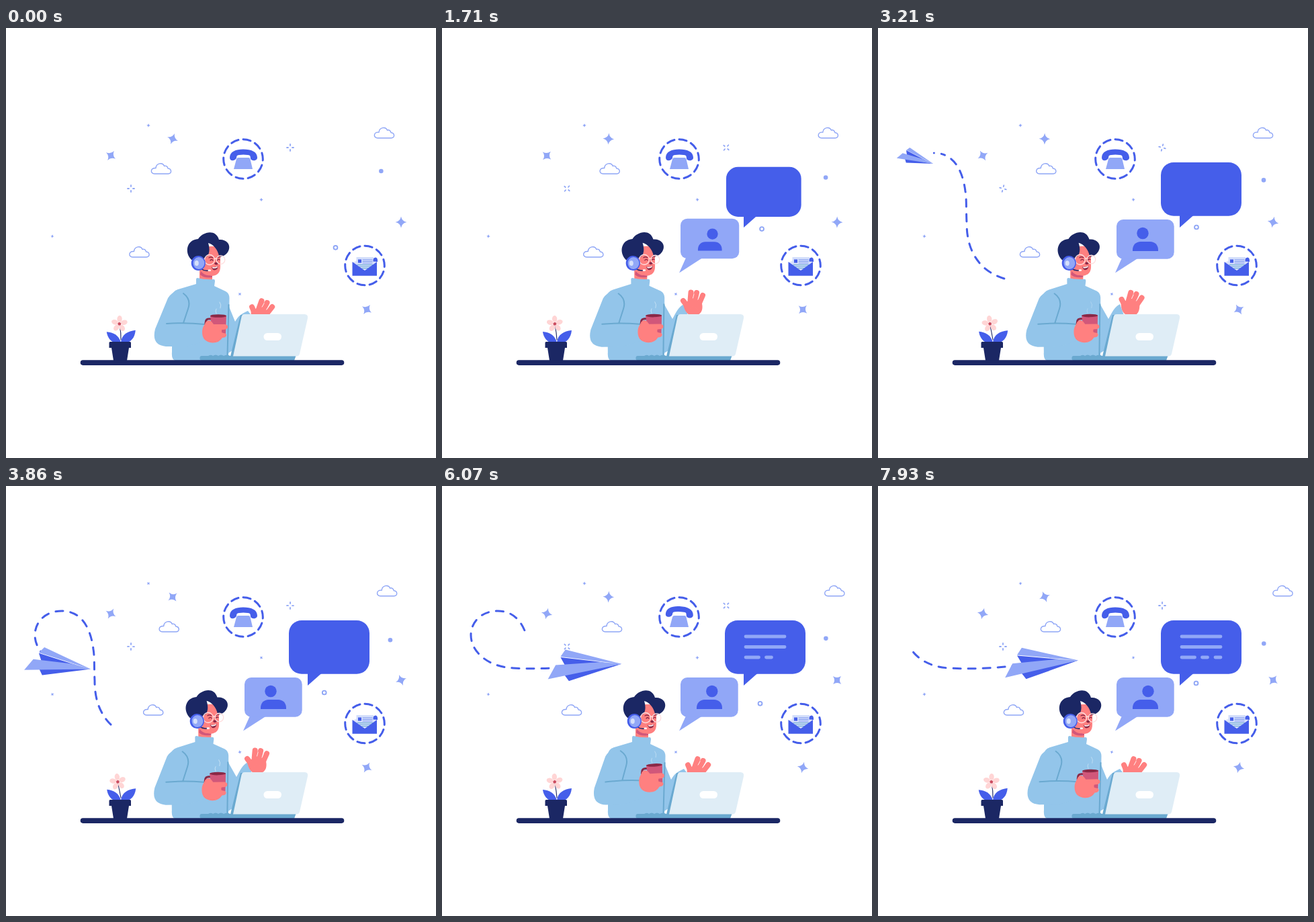
Write an HTML page that moves like this. It is 640 by 640 pixels and loops after 8 s.

```html
<!DOCTYPE html>
<html lang="en">
<head>
<meta charset="utf-8">
<title>Support desk</title>
<style>
  html, body { margin: 0; width: 100%; height: 100%; overflow: hidden; background: #fff; }
  svg { display: block; width: 100%; height: 100%; }
  .blue { fill: #455eea; }
  .pale { fill: #91a7f7; }
  .navy { fill: #1b2764; }
  .skin { fill: #ff8080; }
  .knit { fill: #93c5ea; }
  .shade { fill: #6aa9d0; }
  .wine { fill: #8a2846; }
  .line { fill: none; stroke-linecap: round; stroke-linejoin: round; }
  .fold { stroke: #6aa9d0; stroke-width: 2; }
  .thin { stroke: #8fa6f6; stroke-width: 1.4; }
  .dash { stroke: #455eea; stroke-width: 3; }
  .finger { stroke: #ff8080; stroke-width: 8; }
  .bar { stroke: #91a7f7; stroke-width: 4.8; }
</style>
</head>
<body>
<svg viewBox="0 0 640 640">
  <defs>
    <path id="spark" d="M0-8.5Q1.3-1.3 8.5 0Q1.3 1.3 0 8.5Q-1.3 1.3-8.5 0Q-1.3-1.3 0-8.5Z"/>
    <path id="burst" class="line" stroke="#8fa6f6" stroke-width="1.8" d="M0-5V-3M0 5V3M-5 0H-3M5 0H3"/>
    <path id="cloud" class="line thin" d="M5 0H25.5C31 0 31-7.5 25-8C24.5-11.5 21.5-12.5 19.5-11.5C17-17.5 7.5-16 7-8.5C-1.5-9-1.5 0 5 0Z"/>
    <circle id="ring" class="line dash" r="29.3" pathLength="180" stroke-dasharray="11 7" transform="rotate(-90)"/>
  </defs>

  <g id="sky" class="pale"></g>
  <circle id="bead" class="line" r="2.9" stroke="#8fa6f6" stroke-width="1.9"/>
  <circle id="dot" class="pale" r="3.3"/>

  <!-- Phone -->
  <use href="#ring" x="353" y="195"/>
  <path class="pale" d="M346 193H361Q363 193 363.5 195L367 210H339L343 195Q343.5 193 346 193Z"/>
  <path id="handset" class="blue" d="M333 193C333 184 342 180.5 353 180.5C365 180.5 374 184 374 193C374 197.5 367 198.5 364.5 195.5C363 192 365 189.5 360 189Q353 188 347 189C342 189.5 344 192 342.5 194.500C340 198 333 198.5 333 193Z"/>

  <!-- Mail -->
  <use href="#ring" x="534" y="353.5"/>
  <path class="blue" d="M516 349L534 341L552 349V360H516Z" opacity=".18"/>
  <rect x="521.5" y="341" width="25.5" height="22" fill="#d3defb"/>
  <rect class="blue" x="524" y="344.5" width="5" height="5"/>
  <path class="line" stroke="#7f98ef" d="M531 345H545M531 347.5H545M531 350H545"/>
  <path class="line" stroke="#6aa9d0" d="M523 352.5H546M526 355H543M530 357.5H539"/>
  <path class="blue" d="M515.5 348L534 361L552 348V368.8H515.5Z"/>
  <path class="blue" d="M546.5 347.5Q546 341.5 550 341.5Q553.5 341.5 553 348Z"/>

  <!-- Paper plane -->
  <path id="trail" class="line dash" d="M222 377C195 378 170 370 153 352C138 335 132 315 132 290C131 270 132 255 130 243C126 212 113 186 83 186C58 186 43 203 43 222C43 245 66 269 106 271C140 273 170 271 200 268Q225 265 260 261"/>
  <g id="plane">
    <path class="blue" d="M-34-12L-27 3L30 0ZM-31 13L-24 24L56 4Z"/>
    <path class="pale" d="M-26-23L56 4L-34-13ZM-42-1L25-1L56 4L-55 19Z"/>
  </g>

  <!-- Speech bubbles -->
  <g id="smallBubble">
    <path class="pale" d="M364 340L353 364.5L388 342Z"/>
    <rect class="pale" x="355" y="285" width="85.7" height="58.7" rx="10"/>
    <g id="person" class="blue">
      <circle id="personHead" cy="305.5" r="8.7"/>
      <path d="M379 332V330C379 323 384 318 391 318H405C412 318 417 323 417 330V332Z"/>
    </g>
  </g>
  <g id="bigBubble" class="blue">
    <rect x="421" y="200" width="120" height="79.7" rx="19"/>
    <path d="M449 276V297L470 278.5Z"/>
  </g>
  <g id="message"></g>

  <!-- Plant -->
  <path id="stem" class="line" stroke="#1b2764" stroke-width="1.1"/>
  <g id="leaves" class="blue">
    <path d="M171 468C168 457 160 453 150 452C151 461 157 468 164 469Z"/>
    <path d="M171 468C172 456 182 451 193 450C192 461 186 468 177 469Z"/>
  </g>
  <g id="flower"></g>
  <path class="navy" d="M155 467H184.5Q186 467 186 468.5V476H183L180 495H160L157 476H153.5V468.5Q153.5 467 155 467Z"/>

  <!-- Operator -->
  <path id="farArm" class="knit"/>
  <g id="hand">
    <path class="skin" d="M359 411Q372 400 387 410Q390 426 376 428Q362 429 359 411Z"/>
    <path class="line finger" d="M366 415L359 406M369 412L370.5 393.5M375 411L379 394M381 414L388 398"/>
    <path class="line" stroke="#fff" stroke-width=".8" d="M373.5 402L375 396M381 404L383 399"/>
  </g>
  <g id="body">
    <path class="skin" d="M288 352H307V376H288Z"/>
    <path d="M290 362Q298 371 307 367V371Q295 373 289 367Z" fill="#d1577a"/>
    <path class="skin" d="M289 325H319V355Q319 368 307 369Q292 367 289 355Z"/>
    <path class="navy" d="M276 345C265 334 269 315 286 314C292 304 312 298 317 315C327 314 334 321 332 329C330 337 322 342 317 339C315 330 309 322 301 320C304 330 303 339 296 342C290 346 282 347 276 345Z"/>
    <path class="line" stroke="#8a2846" stroke-width="1.3" d="M302 342Q305 340 308 342M315 342Q317 340 319 341M304 346Q306 343.5 308 346M314 346Q316 343.5 318 345"/>
    <ellipse class="wine" cx="313" cy="350.5" rx="2.7" ry="1.9"/>
    <path class="wine" d="M306 355.5Q311 357 315.5 354Q315.5 360.5 310 360.5Q307 360 306 355.5Z"/>
    <path fill="#fff" d="M307 355.8Q311 357 315 354.5L314.5 356.5Q311 358.5 307.5 357.5Z"/>
    <g class="line" stroke="#ffdede" stroke-width="1.3">
      <circle cx="303" cy="345" r="7.5"/><circle cx="319.5" cy="345" r="6.3"/>
      <path d="M310.5 344Q312 342 313.5 344"/>
    </g>
    <path class="line" stroke="#1b2764" stroke-width="1.5" d="M290 358Q295 362 301 361"/>
    <rect x="300.5" y="359.5" width="4.5" height="2.6" rx="1.3" fill="#fff"/>
    <ellipse class="blue" cx="286.3" cy="350" rx="10.6" ry="11"/>
    <ellipse class="pale" cx="287" cy="350" rx="8.5" ry="9"/>
    <ellipse cx="283.8" cy="350" rx="3" ry="3.9" fill="#d5e0fb"/>

    <path class="knit" d="M285 372Q297 375 309 374Q311 374 311 377L310 384L327 392Q332.5 395 332.5 402L331 495H252Q246 494 247 482V400Q247 392 256 389L283 381L283 374Q283 372 285 372Z"/>
    <path class="line fold" d="M331.5 412L329.5 487"/>
    <g id="nearArm">
      <path class="knit" d="M262 389Q247 392 241 402L222 448Q216 472 238 474H270L297 466V441L262 440L273 412Q274 398 262 389Z"/>
      <path class="line fold" d="M264 395Q276 404 271 418L264 439M239 440Q268 438 295 441"/>
      <g id="mug">
        <path class="line" stroke="#8a2846" stroke-width="3" d="M304 433Q297 432 297 439V446"/>
        <path d="M304 428H328L327 455H307Z" fill="#d1577a"/>
        <ellipse class="wine" cx="316" cy="428.5" rx="12" ry="2.3"/>
        <path id="steam" class="line" stroke="#d9ecf8" stroke-width=".9" d="M313 425Q311 421 313 418M319 417Q321 412 318 408"/>
        <path class="skin" d="M292 453C292 444 296 442 297 438Q301 433 306 437L309 441H326Q331 442 330 446Q329 449 323 449V454Q329 454 328 458Q327 461 322 461Q317 469 307 468.5Q292 467 292 453Z"/>
        <rect x="321" y="449" width="5" height="4.5" rx="1" fill="#d1577a"/>
      </g>
    </g>
  </g>

  <!-- Laptop and desk -->
  <path class="shade" d="M300 489Q304 485 308 488Q312 485 316 488Q320 485 324 488Q330 485 335 489Z"/>
  <path class="shade" d="M291 488H431.5L429 495H291Q288 494 288.5 491Q288.5 488 291 488Z"/>
  <path class="shade" d="M349 427H354L340 488.5H334Z"/>
  <path d="M355 426H444Q450 426 449 432L437 485Q436 488.5 432 488.5H338L350.5 430Q351.5 426 355 426Z" fill="#dfedf6"/>
  <rect x="383.5" y="454" width="26.5" height="11" rx="5.5" fill="#fff"/>
  <rect class="navy" x="110.7" y="494.2" width="392.6" height="7.7" rx="3.8"/>
</svg>

<script>
const LOOP = 8000;
const el = id => document.getElementById(id);
const move = (node, value) => node.setAttribute('transform', value);
const clamp = x => Math.max(0, Math.min(1, x));
const smooth = u => u * u * (3 - 2 * u);
const wave = (t, period, peak = 0) => Math.cos(2 * Math.PI * (t - peak) / period);
const decay = (t, time) => Math.exp(-t / time);
const spring = t => t > 0 ? 1 - decay(t, 250) * Math.cos(t / 341) : 0;

// Eases in and out between [time, value] stops.
function glide(t, ...stops) {
  let value = stops[0][1];
  for (let i = 1; i < stops.length; i++) {
    const [from, a] = stops[i - 1], [to, b] = stops[i];
    value += (b - a) * smooth(clamp((t - from) / (to - from)));
  }
  return value;
}

function add(parent, tag, attributes) {
  const node = document.createElementNS('http://www.w3.org/2000/svg', tag);
  for (const name in attributes) node.setAttribute(name, attributes[name]);
  return parent.appendChild(node);
}

const addSky = shape => add(el('sky'), 'use', { href: '#' + shape });

// Spinning stars: position, size, first angle, degrees per second.
const stars = [
  [156, 190, 1, 35, -48], [248, 165, 1, 20, -62], [588, 289, 1, 0, -52], [537, 419, 1, 35, -48],
  [212, 145, .32, 10, -60], [69, 310, .32, 20, -60], [380, 255.5, .32, 0, -60], [348, 396, .32, 45, -60]
].map(([x, y, size, angle, rate]) => ({ x, y, size, angle, rate, node: addSky('spark') }));

const bursts = [[186, 239], [423, 178]].map(place => ({ place, node: addSky('burst') }));

const clouds = [
  [163.7, [0, 548], [2430, 563], [4200, 551], [7930, 587.5]],
  [217, [0, 216], [2500, 240.5], [4300, 225.5], [6900, 242]],
  [341, [0, 183.5], [2100, 213], [2900, 212], [6000, 178], [8000, 187]]
].map(([y, ...stops]) => ({ y, stops, node: addSky('cloud') }));

// Message bars: left, right, y, time of writing.
const bars = [
  [452, 510, 224, 4000], [452, 510, 239.5, 4430],
  [452, 471.5, 255, 5100], [482.5, 490.5, 255, 5550], [502, 510, 255, 6150]
].map(([left, right, y, from]) =>
  ({ left, right, y, from, node: add(el('message'), 'path', { class: 'line bar' }) }));

for (let i = 0; i < 5; i++)
  add(el('flower'), 'ellipse', { cy: -7.3, rx: 3.7, ry: 5, fill: '#ffd5d5', transform: `rotate(${i * 72})` });
add(el('flower'), 'circle', { r: 2.4, fill: '#cc4d60' });

function drawSky(t) {
  for (const s of stars)
    move(s.node, `translate(${s.x} ${s.y}) rotate(${s.angle + s.rate * t / 1000}) scale(${s.size})`);
  for (const b of bursts)
    move(b.node, `translate(${b.place}) rotate(${22 - 22 * wave(t, 4000)})`);
  for (const c of clouds) move(c.node, `translate(${glide(t, ...c.stops)} ${c.y})`);

  move(el('bead'), `translate(${473.5 + 17 * decay(t, 900)} ${310 + 18 * wave(t, 5760, 5430)})`);
  const dotX = 572 - 11 * decay(t, 900) + 3 * wave(t, 4700, 2700);
  const dotY = 231 - 18 * decay(t, 2200) + 4 * t / LOOP * wave(t, 3700, 4300);
  move(el('dot'), `translate(${dotX} ${dotY})`);

  const sinceRing = t % 3640 - 2430;
  const ringing = Math.exp(-((sinceRing / 180) ** 2));
  move(el('handset'), `translate(0 ${-1.5 * ringing}) rotate(${3 * ringing * Math.cos(sinceRing / 35)} 353 190)`);
}

function drawPlane(t) {
  const trail = el('trail'), plane = el('plane'), since = t - 2430;
  trail.style.display = since > -140 ? '' : 'none';
  plane.style.display = since > -30 ? '' : 'none';

  const tail = 359 * clamp(since / 5500) ** 1.2;
  const head = 512 * (1 - decay(since + 140, 1300));
  const dashes = [];
  for (let s = tail; s < head; s += 22) dashes.push(Math.min(11, head - s), 11);
  trail.setAttribute('stroke-dasharray', [...dashes, 0, 2000].join(' '));
  trail.setAttribute('stroke-dashoffset', -tail);

  const p = trail.getPointAtLength(570 - 440 * decay(since, 1600));
  const angle = -6 + 13 * decay(since - 1430, 1200);
  move(plane, `translate(${p.x} ${p.y - 2}) rotate(${angle}) scale(${clamp((since + 30) / 1650)})`);
}

function drawBubbles(t) {
  const grow = (id, x, y, s) => move(el(id), `translate(${x} ${y}) scale(${s}) translate(${-x} ${-y})`);
  grow('smallBubble', 353, 364.5, spring(t - 700));
  grow('person', 398, 332, spring(t - 1310));
  grow('bigBubble', 449, 297, spring(t - 1300));
  el('personHead').setAttribute('cx', glide(t, [1700, 402], [2430, 394], [3860, 394], [6300, 402]));
  for (const b of bars) {
    const u = clamp((t - b.from) / 430);
    b.node.setAttribute('d', u ? `M${b.left} ${b.y}H${b.left + (b.right - b.left) * u}` : '');
  }
}

function drawOperator(t) {
  const raise = glide(t, [950, 0], [1350, 1], [4100, 1], [4600, 0]), low = 1 - raise;
  const greeting = 6.5 - 6.5 * wave(t, 1100, 1710);
  move(el('body'), `rotate(${-.8 * raise} 285 494)`);
  move(el('hand'), `translate(${2 * low} ${12 * low}) rotate(${raise * greeting + 15 * low} 372 424)`);
  el('farArm').setAttribute('d', `M330 410L${343 - 2 * low} ${433 + 4 * low}C${348 - 2 * low} ${424 + 4 * low} 351 ${416 + 9 * low} 360 ${411 + 10 * low}L367 430L345 475L329 485Z`);

  const lift = glide(t, [5300, 0], [6600, 20], [8500, 0]);
  move(el('nearArm'), `translate(${.16 * lift} ${-.05 * lift}) rotate(${-.25 * lift} 262 400)`);
  move(el('mug'), `translate(${-.25 * lift} ${-.75 * lift})`);
  el('steam').setAttribute('opacity', .5 + .3 * wave(t, 1900));
}

function drawPlant(t) {
  const sway = wave(t, LOOP), x = 167.6 + 1.2 * sway;
  move(el('flower'), `translate(${x} 440.3) rotate(${-3 + 5 * sway})`);
  el('stem').setAttribute('d', `M${x + .5} 444Q${x + 2.5} 453 171 464`);
  move(el('leaves'), `rotate(${-.8 * sway} 171 468)`);
}

const start = performance.now();
function frame() {
  const t = (performance.now() - start) % LOOP;
  for (const draw of [drawSky, drawPlane, drawBubbles, drawOperator, drawPlant]) draw(t);
  requestAnimationFrame(frame);
}
frame();
</script>
</body>
</html>
```
